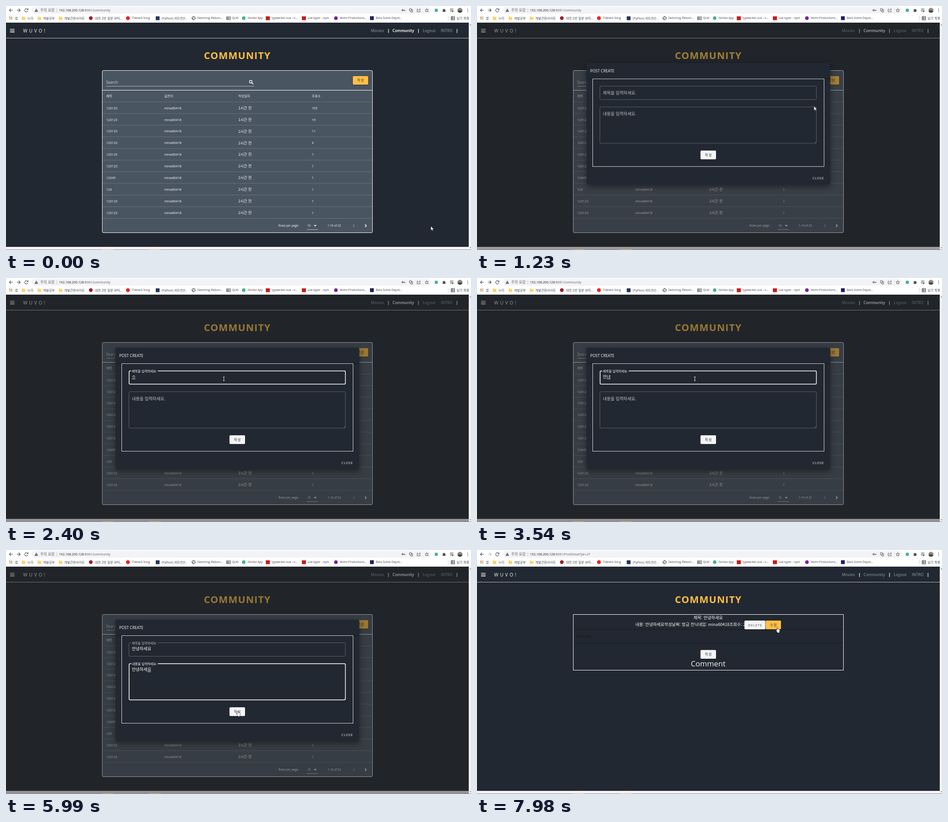
Write an HTML page that moves like this. It is 1031 px wide and 543 px high and loops after 8000 ms.

```html
<!DOCTYPE html>
<html lang="ko">
<head>
<meta charset="utf-8">
<title>Community board</title>
<style>
html, body { margin: 0; width: 100%; height: 100%; overflow: hidden; background: #222831; }
svg { display: block; width: 1031px; height: 543px; font-family: "Open Sans", "Noto Sans CJK KR", sans-serif; }
text { white-space: pre; }
.k { font-family: "Noto Sans CJK KR", "Noto Sans CJK JP", sans-serif; }
.line { fill: none; stroke: #fff; }
.icon { fill: none; stroke: #4a4d51; stroke-width: 1.1; }
.mid { text-anchor: middle; }
.btn { font-size: 7.6px; letter-spacing: 1px; text-anchor: middle; fill: #33373d; }
.lift { filter: drop-shadow(0 1px 1px rgba(0,0,0,.4)); }
.typed { font-size: 9.35px; fill: #fff; }
[data-on] { visibility: hidden; }
[data-on].on { visibility: visible; }

#cursor, #scrim, #dialog, .label, #fading { animation: 8s infinite; }
#cursor { animation-name: travel; }
#scrim { animation-name: dim; animation-timing-function: cubic-bezier(.25,.8,.25,1); }
#dialog { animation-name: drop; animation-timing-function: cubic-bezier(.25,.8,.25,1); filter: drop-shadow(0 5px 7px rgba(0,0,0,.45)); }
#fading { animation-name: fade; animation-timing-function: linear; }
.label { font-size: 9.4px; animation-timing-function: cubic-bezier(.25,.8,.5,1); }
#label1 { animation-name: float1; }
#label2 { animation-name: float2; }

@keyframes travel {
  0%, .1% { transform: translate(942px,490px); animation-timing-function: ease-out; }
  2.875%, 5.6% { transform: translate(824px,283px); animation-timing-function: ease-in-out; }
  10.2%, 13.6% { transform: translate(793px,161px); animation-timing-function: ease-in; }
  15.375% { transform: translate(748px,223px); animation-timing-function: ease-out; }
  22%, 68.4% { transform: translate(483px,224px); animation-timing-function: ease-in-out; }
  74.2%, 78.4% { transform: translate(513px,358px); }
  78.7%, 83.6% { transform: translate(515px,357px); animation-timing-function: ease-in-out; }
  89% { transform: translate(567px,322px); animation-timing-function: ease-in-out; }
  93.6% { transform: translate(538px,303px); animation-timing-function: ease-in-out; }
  97.6% { transform: translate(676px,174px); animation-timing-function: ease-in-out; }
  99.6%, 100% { transform: translate(665px,172px); }
}
@keyframes dim {
  0%, 13.81% { opacity: 0; }
  17.56%, 78.6% { opacity: .46; }
  81%, 100% { opacity: 0; }
}
@keyframes drop {
  0%, 13.81% { transform: translateY(-270px); }
  17.56%, 100% { transform: translateY(0); }
}
@keyframes fade {
  0%, 54.9% { opacity: .9; }
  56.4%, 100% { opacity: 0; }
}
@keyframes float1 {
  0%, 23.75% { transform: translate(279px,225px) scale(1); fill: #c2c5c9; }
  27.5%, 52.6% { transform: translate(279px,209.6px) scale(.75); fill: #fff; }
  56.4%, 100% { transform: translate(279px,209.6px) scale(.75); fill: #bcbfc3; }
}
@keyframes float2 {
  0%, 52.6% { transform: translate(279px,271.5px) scale(1); fill: #c2c5c9; }
  54.875% { transform: translate(279px,257px) scale(.755); fill: #d0d2d5; }
  56.4%, 100% { transform: translate(279px,256.2px) scale(.75); fill: #fff; }
}
</style>
</head>
<body>
<svg viewBox="0 0 1031 543">
  <!-- page -->
  <rect y="37" width="1026" height="500" fill="#222831"/>
  <path d="M0 71.5H1026" stroke="#b9bcc0"/>
  <path d="M9 51.6H19M9 54.8H19M9 58H19" stroke="#fff" stroke-width="1.3"/>
  <text x="38" y="59" font-size="10" letter-spacing="4" fill="#fff">WUVO!</text>
  <g font-size="8.5" font-weight="600" fill="#7d8188">
    <text x="809" y="58">Movies</text>
    <text x="857" y="58">Community</text>
    <text x="857" y="58" fill="#fff" data-on="0 6290">Community</text>
    <text x="924" y="58">Logout</text>
    <text x="964" y="58">INTRO</text>
    <path d="M848 51V60M914.5 51V60M1000 51V60" stroke="#fff" stroke-width="1.2"/>
  </g>
  <text class="mid" x="513" y="118" font-size="21.5" font-weight="700" letter-spacing="1.2" fill="#ffc045">COMMUNITY</text>

  <!-- board -->
  <g data-on="0 6290">
    <rect x="213.5" y="143.5" width="599" height="361" rx="2.5" fill="#4a5562" stroke="#fff"/>
    <path d="M214 187.5H812" stroke="#fff"/>
    <text x="222" y="173" font-size="8.3" fill="#d3d6da">Search</text>
    <path d="M222 178.5H550" stroke="#b7bcc2"/>
    <circle cx="542.7" cy="168.4" r="2.9" class="line" stroke-width="1.4"/>
    <path d="M544.8 170.5L548.5 174.2" stroke="#fff" stroke-width="1.7"/>
    <rect class="lift" x="769" y="156" width="34" height="19" rx="2" fill="#ffc045"/>
    <text class="btn k" x="786.5" y="168.4">작성</text>
    <g class="k" font-size="7.1" fill="#f0f1f2">
      <text x="222" y="202.7">제목</text>
      <text x="351" y="202.7">글쓴이</text>
      <text x="515" y="202.7">작성일자</text>
      <text x="678" y="202.7">조회수</text>
    </g>
    <g id="rows" font-size="7.3" fill="#fff"></g>
    <g font-size="6.4" fill="#fff">
      <text x="604" y="491.2">Rows per page:</text>
      <text x="668" y="491.2">10</text>
      <text x="713" y="491.2">1-10 of 22</text>
    </g>
    <path d="M682.5 487.5H688.7L685.6 490.7Z" fill="#fff"/>
    <path d="M667 497.5H691.5" stroke="#b7bcc2"/>
    <path d="M772.5 486L769.5 489 772.5 492" class="line" stroke-width="1.2" opacity=".35"/>
    <path d="M796 486L799 489 796 492" class="line" stroke-width="1.5"/>
  </g>

  <!-- post -->
  <g data-on="6290 8000">
    <g class="k" fill="#fff">
      <text class="mid" x="512.5" y="153.6" font-size="9.3">제목: 안녕하세요</text>
      <text x="351" y="169" font-size="9.18">내용: 안녕하세요작성날짜: 방금 전닉네임: mina60418조회수: 2</text>
    </g>
    <path d="M214 177H812M214 206.5H812" stroke="#171b21"/>
    <rect x="213.5" y="143.5" width="599" height="124" class="line"/>
    <rect class="lift" x="593" y="157" width="46.5" height="19.5" rx="2" fill="#f5f5f7"/>
    <text x="601.5" y="169.6" font-size="6.6" letter-spacing="1.4" fill="#33373d">DELETE</text>
    <rect class="lift" x="640" y="157" width="34" height="19.5" rx="2" fill="#ffc045"/>
    <text class="btn k" x="657.5" y="169.6">수정</text>
    <text x="220" y="194.5" font-size="8.4" fill="#12151a">One row</text>
    <rect class="lift" x="495.5" y="222.5" width="34.5" height="19.5" rx="2" fill="#f5f5f7"/>
    <text class="btn k" x="513.3" y="235.3">작성</text>
    <text class="mid" x="512.5" y="259" font-size="16.7" fill="#f2f3f4">Comment</text>
  </g>

  <rect y="536" width="1026" height="6" fill="#f2f1f5"/>
  <rect id="scrim" y="37" width="1026" height="506" fill="#212121"/>

  <!-- dialog -->
  <g data-on="1105 6290"><g id="dialog">
    <rect x="243" y="155" width="540" height="270" rx="2.5" fill="#222831"/>
    <rect class="lift" x="243" y="155" width="540" height="34" rx="2.5" fill="#222831"/>
    <text x="251" y="175.7" font-size="8.6" fill="#fff">POST CREATE</text>
    <rect x="256.5" y="190.5" width="513" height="195" class="line" stroke-opacity=".85"/>
    <g class="line" stroke-opacity=".27">
      <rect x="272.5" y="206.5" width="480" height="30" rx="2.5"/>
      <rect x="272.5" y="253" width="480" height="81" rx="2.5"/>
    </g>
    <rect data-on="4210 4520" id="fading" x="272.5" y="206.5" width="480" height="30" rx="2.5" class="line"/>
    <rect data-on="1900 4210" x="273" y="206.8" width="479.5" height="29.5" rx="2.5" class="line" stroke-width="1.5"/>
    <rect data-on="4210 6290" x="273" y="253" width="479.5" height="80.5" rx="2.5" class="line" stroke-width="1.5"/>
    <path d="M749 332.5L751.5 330M750.5 333L752 331.5" stroke="#a5a8ad" stroke-width=".6"/>
    <rect data-on="2000 6290" x="277.5" y="205" width="59" height="4" fill="#222831"/>
    <rect data-on="4420 6290" x="277.5" y="251.5" width="59" height="4" fill="#222831"/>
    <text id="label1" class="label k">제목을 입력하세요.</text>
    <text id="label2" class="label k">내용을 입력하세요.</text>
    <text id="title" class="typed k" x="279" y="222.5"></text>
    <rect id="titleMark" y="224" width="8" height=".9" fill="#fff"/>
    <text id="body" class="typed k" x="279" y="269.3"></text>
    <rect id="bodyMark" y="270.5" width="8" height=".9" fill="#fff"/>
    <path data-on="4390 4450" d="M288 260.5V271" stroke="#fff" stroke-width=".8"/>
    <rect class="lift" x="495.5" y="350" width="34.5" height="19.5" rx="2" fill="#f5f5f7"/>
    <text class="btn k" x="513.3" y="362.8">작성</text>
    <text x="744" y="414" font-size="7" letter-spacing=".9" fill="#fff">CLOSE</text>
  </g></g>

  <!-- window edges -->
  <rect x="1026" y="37" width="5" height="506" fill="#f1f1f2"/>
  <path d="M1028 43L1030 40.5 1031 43ZM1028 537L1030 539.5 1031 537Z" fill="#76787b"/>
  <path d="M0 542.5H1031" stroke="#8a8a92"/>
  <path d="M212 542.5H238M317 542.5H343" stroke="#eeaa62"/>

  <!-- browser bar -->
  <rect width="1031" height="37" fill="#fff"/>
  <rect x="57" y="2" width="886" height="15" rx="7.5" fill="#f1f3f4"/>
  <g class="icon">
    <path d="M15 9.5H7.5M11 6L7.5 9.5 11 13"/>
    <path d="M24 9.5H31.5M28 6L31.5 9.5 28 13" stroke="#b9bbbe"/>
    <path data-on="0 6290" d="M24 9.5H31.5M28 6L31.5 9.5 28 13"/>
    <path d="M48.5 8A3.7 3.7 0 1 0 48.7 10.7M49 5.5V8.3H46.2"/>
    <circle cx="879.3" cy="9.5" r="1.6"/><path d="M881 9.5H885.5M884 9.5V11.5"/>
    <path d="M894.5 6H899V11H894.5ZM897.5 8H901.5V13.5H898L897 11" stroke-width=".9"/>
    <path d="M914 7H911.7V13H918.5V10.5M914 10.5Q914.5 8 918.5 7.5M916.8 5.5L919 7.5 916.8 9.5" stroke-width=".9"/>
    <path d="M933 5.7L934.1 8.3 936.9 8.5 934.8 10.4 935.4 13.1 933 11.7 930.6 13.1 931.2 10.4 929.1 8.5 931.9 8.3Z" stroke-width=".9"/>
    <path d="M984.5 6.5H992M984.5 9H990M984.5 11.5H988"/><circle cx="990" cy="12" r="1" fill="#4a4d51"/><path d="M991.3 12V8.5"/>
  </g>
  <path d="M67.2 5.8L71 12.8H63.4Z" fill="#4a4d51"/><path d="M67.2 8.2V10.4M67.2 11V11.9" stroke="#fff" stroke-width=".8"/>
  <path d="M968 7.5H970Q971 4.5 972 7.5H974V9.5Q977 10.3 974 11.3V13H968V11.2Q970.5 10.3 968 9.3Z" fill="#4a4d51"/>
  <circle cx="954" cy="9.5" r="3.7" fill="#41b883"/>
  <circle cx="1006.5" cy="9.5" r="5.5" fill="#8e8a83"/><path d="M1001.2 11Q1006 8 1011.8 11A5.5 5.5 0 0 1 1001.2 11" fill="#4d4945"/>
  <path d="M1023.5 6V7.4M1023.5 9V10.4M1023.5 12V13.4" stroke="#4a4d51" stroke-width="1.4"/>
  <text class="k" x="76" y="12.4" font-size="8" fill="#5f6368">주의 요함</text>
  <path d="M112.5 5V14" stroke="#c6c9cc"/>
  <g font-size="7.2" fill="#5f6368">
    <text x="117.5" y="12.2" data-on="0 6290"><tspan fill="#202124">192.168.200.128</tspan>:8081/community</text>
    <text x="117.5" y="12.2" data-on="6290 8000"><tspan fill="#202124">192.168.200.128</tspan>:8081/PostDetail?pk=27</text>
  </g>

  <!-- bookmarks -->
  <path d="M7 24.5H14" stroke="#e0533d" stroke-width="1.7" stroke-dasharray="1.7 1"/>
  <path d="M7 27.2H14" stroke="#4a9a5a" stroke-width="1.7" stroke-dasharray="1.7 1"/>
  <path d="M7 29.9H14" stroke="#e0a83d" stroke-width="1.7" stroke-dasharray="1.7 1"/>
  <g fill="#fad46a">
    <path id="folder" d="M35 23.5H38L39 24.5H43V31H35Z"/>
    <use href="#folder" x="35"/><use href="#folder" x="82"/>
  </g>
  <circle cx="188" cy="27" r="4.2" fill="#a3202c"/>
  <circle cx="270.3" cy="27" r="4.3" fill="#f02020"/>
  <rect x="332" y="23" width="8.5" height="8.5" fill="#27375c"/>
  <g class="icon" stroke-width=".9">
    <circle cx="416" cy="27" r="3.8"/><path d="M412.5 26Q415 28 415.5 30.5M416 23.5Q415 26 419.5 27.5"/>
    <path d="M489 24H497.5V30.5H489ZM490.5 26H493V28.5H490.5ZM494 26.3H496M494 28.3H496"/>
    <path d="M987 23.5H994.5V31H987ZM987 26H994.5M987 28.5H994.5M989.5 23.5V31"/>
  </g>
  <circle cx="527" cy="27" r="3.9" fill="#41b883"/>
  <path d="M576 23H585V31.5H576ZM656 23H665V31.5H656Z" fill="#cb1b1b"/>
  <circle cx="731.5" cy="27" r="4" fill="#7a1fa0"/>
  <rect x="807" y="22.8" width="8.5" height="8.5" fill="#20205c"/>
  <path d="M980.5 22V32" stroke="#d0d2d5"/>
  <g fill="#43464a" font-size="6.4">
    <g class="k" font-size="7.1">
      <text x="19.5" y="29.7">앱</text><text x="47.5" y="29.7">누리</text>
      <text x="82" y="29.7">개발공부</text><text x="129" y="29.7">개발관련사이트</text>
      <text x="197" y="29.7">대전 2반 질문 보따...</text>
      <text x="345" y="29.6" font-size="6.6">[Python] 비트연산...</text>
      <text x="999" y="29.7">읽기 목록</text>
    </g>
    <text x="279" y="29.4">Tidelark Song</text>
    <text x="424" y="29.4">Sketching Ribbon...</text>
    <text x="501" y="29.4">QLM</text>
    <text x="536" y="29.4">Nimbo App</text>
    <text x="589" y="29.4">typewriter-vue - n...</text>
    <text x="669" y="29.4">vue-typer - npm</text>
    <text x="740" y="29.4">Wolm Productions...</text>
    <text x="820" y="29.4">Bare Scene Depot...</text>
  </g>

  <g id="cursor">
    <path data-on="0 760 1110 1250 5600 5650 5820 5860 6290 7700" d="M0 0V9.2L2.1 7.3 3.5 10.4 5 9.8 3.6 6.7H6.4Z" fill="#fff" stroke="#111" stroke-width=".5"/>
    <path data-on="760 1110 5860 6290 7700 8000" d="M0 1V6.5L-1.2 5.8Q-2.8 5.9 -1.8 7.3L1 11.5V12.5H5.3V11.5L6.2 8.5V5Q5.6 4 4.9 4.6 4.2 3.7 3.4 4.3 2.8 3.5 2 4V1Q1 -.4 0 1Z" fill="#fff" stroke="#111" stroke-width=".7"/>
    <path data-on="1250 5600 5650 5820" d="M-1.7 -4H1.7M0 -4V4.5M-1.7 4.5H1.7" class="line" stroke-width=".9"/>
  </g>
</svg>
<script>
const $ = id => document.getElementById(id);
const LOOP = 8000, CHAR = 8.6;

// board rows
const titles = ['123123', '123123', '123123', '123123', '123123', '123123', '12345', '123', '123123', '123123'];
const views = [105, 19, 11, 4];
$('rows').innerHTML = '<path d="M214 213.5H812" stroke="#69737f"/>' + titles.map((title, i) => {
  const y = 229.6 + 25.9 * i, rule = 239.4 + 25.9 * i;
  return `<text x="222" y="${y}">${title}</text><text x="351" y="${y}">mina60418</text>
    <text class="k" x="515" y="${y + .2}" font-size="8.2">${i < 2 ? 1 : 2}시간 전</text>
    <text x="678" y="${y}">${views[i] || 1}</text><path d="M214 ${rule}H812" stroke="#69737f"/>`;
}).join('');

// key presses: time and field content
const titleKeys = [[2400, 'ㅇ'], [2480, '아'], [2560, '안'], [2700, '안ㄴ'], [2920, '안'], [2990, '아'], [3060, 'ㅇ'],
  [3130, ''], [3200, 'ㅇ'], [3260, '아'], [3410, '안'], [3470, '안ㄴ'], [3540, '안녀'], [3720, '안녕'], [3790, '안녕ㅎ'],
  [3860, '안녕하'], [3930, '안녕하ㅅ'], [4000, '안녕하세'], [4070, '안녕하세ㅇ'], [4140, '안녕하세요']];
const bodyKeys = [[4380, 'ㅇ'], [4450, '아'], [4510, '안'], [4650, '안ㄴ'], [4720, '안녀'], [4900, '안녕'], [4980, '안녕ㅎ'],
  [5060, '안녕하'], [5140, '안녕하세'], [5220, '안녕하세ㅇ'], [5290, '안녕하세요']];

function type(id, keys, t, done) {
  let value = '';
  for (const [time, text] of keys) if (t >= time) value = text;
  if ($(id).textContent !== value) $(id).textContent = value;
  const mark = $(id + 'Mark');
  mark.setAttribute('x', 279 + CHAR * (value.length - 1));
  mark.setAttribute('opacity', value && t < done ? 1 : 0);
}

// data-on holds pairs of start and end times
const timed = [...document.querySelectorAll('[data-on]')].map(el => [el, el.dataset.on.split(' ').map(Number)]);

function draw(t) {
  for (const [el, marks] of timed) el.classList.toggle('on', marks.filter(m => t >= m).length % 2 === 1);
  type('title', titleKeys, t, 4210);
  type('body', bodyKeys, t, 6290);
}

let start;
function tick(now) {
  start ??= now;
  draw((now - start) % LOOP);
  requestAnimationFrame(tick);
}
draw(0);
requestAnimationFrame(tick);
</script>
</body>
</html>
```
